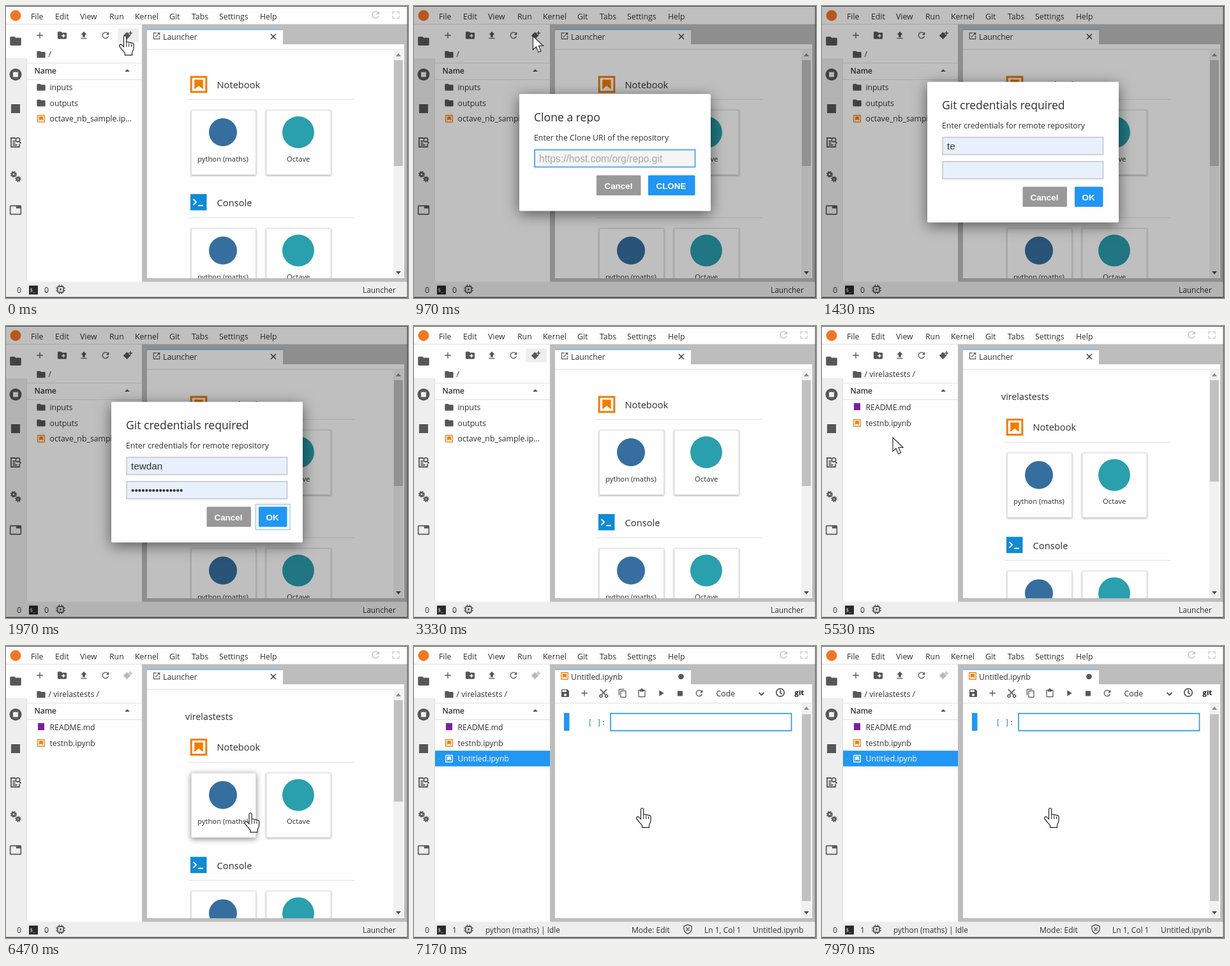
An HTML page for the animation above (8 s loop, 630 by 458 pixels).

```html
<!DOCTYPE html>
<html lang="en">
<head>
<meta charset="utf-8">
<title>Cloning a repository</title>
<style>
html, body { margin: 0; width: 100%; height: 100%; overflow: hidden; background: #fff; }
svg { display: block; width: 100vw; height: 100vh; }
text { font-family: "Open Sans", "Noto Sans", sans-serif; white-space: pre; }
.arial { font-family: "Liberation Sans", Arial, sans-serif; }
.mono { font-family: "DejaVu Sans Mono", monospace; }
.card { filter: drop-shadow(0 1px 1.5px #0005); }
.raised { filter: drop-shadow(0 2px 4px #0007); }
.dialog { filter: drop-shadow(0 5px 11px #0008); }
</style>
</head>
<body>
<svg id="stage" viewBox="0 0 630 458"></svg>
<script>
const LOOP = 8000;
const REPO = 'virelastests';
const C = {
  paper: '#fefefe', chrome: '#eeeeee', line: '#e0e0e2', gap: '#bdbdbd', ink: '#303030',
  icon: '#575757', blue: '#2196f3', orange: '#f57c00', pale: '#c4c4c4', muted: '#999999'
};

const rect = (x, y, w, h, fill, more = '') =>
  `<rect x="${x}" y="${y}" width="${w}" height="${h}" fill="${fill}" ${more}/>`;
const box = (x, y, w, h, stroke, more = '') =>
  rect(x, y, w, h, 'none', `stroke="${stroke}" ${more}`);
const disc = (x, y, r, fill) => `<circle cx="${x}" cy="${y}" r="${r}" fill="${fill}"/>`;
const ring = (x, y, r, width, more = '') =>
  `<circle cx="${x}" cy="${y}" r="${r}" fill="none" stroke="${C.icon}" stroke-width="${width}" ${more}/>`;
const path = (d, fill, more = '') => `<path d="${d}" fill="${fill}" ${more}/>`;
const stroke = (d, color, width = 1.5) =>
  path(d, 'none', `stroke="${color}" stroke-width="${width}"`);
const text = (x, y, s, size = 12.3, fill = C.ink, more = '') =>
  `<text x="${x}" y="${y}" font-size="${size}" fill="${fill}" ${more}>${s}</text>`;
const group = (id, body, more = '') => `<g id="${id}" ${more}>${body}</g>`;

const GLYPH = {
  folder: 'M10 4H4c-1.1 0-2 .9-2 2v12c0 1.1.9 2 2 2h16c1.1 0 2-.9 2-2V8c0-1.1-.9-2-2-2h-8z',
  newFolder: 'M10 4H4c-1.1 0-2 .9-2 2v12c0 1.1.9 2 2 2h16c1.1 0 2-.9 2-2V8c0-1.1-.9-2-2-2h-8zM14 9h2v3h3v2h-3v3h-2v-3h-3v-2h3z',
  plus: 'M19 13h-6v6h-2v-6H5v-2h6V5h2v6h6z',
  upload: 'M5 20h14v-2H5zM5 10h4v6h6v-6h4l-7-7z',
  refresh: 'M17.65 6.35A8 8 0 0 0 12 4a8 8 0 1 0 7.73 10h-2.08A6 6 0 1 1 12 6c1.66 0 3.14.69 4.22 1.78L13 11h7V4z',
  tabs: 'M21 3H3a2 2 0 0 0-2 2v14a2 2 0 0 0 2 2h18a2 2 0 0 0 2-2V5a2 2 0 0 0-2-2zM21 19H3V5h10v4h8z',
  open: 'M19 19H5V5h7V3H3v18h18v-9h-2zM14 3v2h3.6l-9.8 9.8 1.4 1.4L19 6.4V10h2V3z',
  save: 'M17 3H5a2 2 0 0 0-2 2v14a2 2 0 0 0 2 2h14a2 2 0 0 0 2-2V7zM12 19a3 3 0 1 1 0-6 3 3 0 0 1 0 6zM15 9H5V5h10z',
  copy: 'M16 1H4a2 2 0 0 0-2 2v14h2V3h12zM19 5H8a2 2 0 0 0-2 2v14a2 2 0 0 0 2 2h11a2 2 0 0 0 2-2V7a2 2 0 0 0-2-2zM19 21H8V7h11z',
  paste: 'M19 3h-4a3 3 0 0 0-6 0H5a2 2 0 0 0-2 2v15a2 2 0 0 0 2 2h14a2 2 0 0 0 2-2V5a2 2 0 0 0-2-2zM19 20H5V5h2v3h10V5h2z',
  play: 'M8 5v14l11-7z',
  full: 'M5 14H3v7h7v-2H5zM3 10h2V5h5V3H3zM19 19h-5v2h7v-7h-2zM14 3v2h5v5h2V3z',
  caret: 'M6 15l6-6 6 6z'
};
// Icons are drawn on a 24 unit grid, centred on (x, y).
const icon = (name, x, y, size = 16, fill = C.icon) =>
  path(GLYPH[name], fill, `fill-rule="evenodd" transform="translate(${x - size / 2} ${y - size / 2}) scale(${size / 24})"`);
const bookmark = (x, y, s, color = C.orange) =>
  box(x - s * 7 / 16, y - s * 7 / 16, s * 7 / 8, s * 7 / 8, color, `stroke-width="${s / 9}"`) +
  path(`M${x - s * .25} ${y - s * .28}h${s * .5}v${s * .56}l${-s * .25} ${-s * .2}l${-s * .25} ${s * .2}z`, color);
const gear = (x, y, r) =>
  ring(x, y, r, 2.4) + ring(x, y, r + 1.6, 1.8, `stroke-dasharray="${(r + 1.6) * Math.PI / 8}"`);

function menuBar() {
  const items = { File: 39, Edit: 77, View: 116, Run: 162, Kernel: 202, Git: 256, Tabs: 291, Settings: 334, Help: 398 };
  return rect(0, 0, 630, 29, C.paper) + disc(15, 15, 8.5, '#f37726') +
    Object.entries(items).map(([s, x]) => text(x, 20.5, s)).join('') +
    group('corner', icon('refresh', 579, 14, 18, C.pale) + icon('full', 611, 14, 15, C.pale));
}

function sideBar() {
  return rect(0, 29, 33, 404, C.chrome) + rect(0, 29, 33, 53, C.paper) + rect(32, 82, 1, 350, C.line) +
    icon('folder', 15, 55, 21) +
    disc(15, 107.5, 9.5, C.icon) + rect(11, 103.5, 8, 8, C.chrome, 'rx="1"') +
    rect(8, 154, 14, 14, C.icon) +
    stroke('M15 207H8v14h13v-5M10.5 212h4M10.5 215h4M10.5 218h7', C.icon, 1.8) +
    ring(18.5, 210, 3.2, 1.8) + stroke('M20.5 212.5l3 3', C.icon, 1.8) +
    gear(12, 264, 2.7) + gear(19, 271.5, 2.2) +
    icon('tabs', 15, 320, 20);
}

const fileText = (row, s, fill) => text(68.5, 132 + row * 24.6, s, 12.25, fill);
const dirRow = (row, s, fill) => icon('folder', 55, 127.5 + row * 24.6, 16, fill || C.icon) + fileText(row, s, fill);
const bookRow = (row, s, fill) => bookmark(55, 127.5 + row * 24.6, 12, fill) + fileText(row, s, fill);
const rowBand = (row, fill) => rect(33, 115 + row * 24.6, 180, 24.6, fill);

function filePanel() {
  const crumb = s => icon('folder', 55, 76, 16) + text(66.5, 80, s);
  return rect(33, 29, 180, 404, C.paper) +
    group('hoverClone', rect(175, 35, 33, 22, C.chrome)) +
    icon('plus', 53, 46) + icon('newFolder', 88, 46, 17) + icon('upload', 122, 46) + icon('refresh', 156, 46) +
    group('cloneIcon', rect(185.5, 42.5, 8, 8, C.icon, 'transform="rotate(45 189.5 46.5)"') + stroke('M195 39.5v6M192 42.5h6', C.icon, 1.4)) +
    rect(33, 89, 180, 1, C.line) + rect(33, 115, 180, 1, C.line) +
    text(44.5, 106, 'Name', 11.9, C.ink, 'font-weight="600"') + icon('caret', 190, 101, 16) +
    group('root', crumb('/') + dirRow(0, 'inputs') + dirRow(1, 'outputs') +
      group('before', bookRow(2, 'octave_nb_sample.ip...')) +
      group('cloned', bookRow(3, 'octave_nb_sample.ip...') +
        group('plainRow', dirRow(2, REPO)) +
        group('pickedRow', rowBand(2, C.blue) + dirRow(2, REPO, '#fff')))) +
    group('inside', crumb(`/ ${REPO} /`) + rect(50, 121, 10, 11, '#7b1fa2') + fileText(0, 'README.md') + bookRow(1, 'testnb.ipynb')) +
    group('newFile', rowBand(2, C.blue) + disc(39, 177, 2, '#4caf50') + bookRow(2, 'Untitled.ipynb', '#fff'));
}

function launcherSection(y, title, mark) {
  const card = (x, label, labelX, logo, key) =>
    rect(x, y + 40.5, 101, 101, C.paper, `class="card" id="${key}" stroke="${C.line}" stroke-width="1"`) + logo +
    text(labelX, y + 120.5, label, 11.3);
  return mark + text(330.5, y + 5.5, title, 14.7) + rect(286, y + 23, 260, 1, C.line) +
    card(290.5, 'python (maths)', 300, disc(340, y + 75, 22, '#366f9f'), title + 'Python') +
    card(408, 'Octave', 440, disc(458, y + 75, 25, '#2a9fae'), title + 'Octave');
}

const scrollBar = (top, thumb, height) =>
  rect(607, top, 15, 427 - top, '#f1f1f1') + rect(608, thumb, 14, height, '#c1c1c1') +
  path(`M611 ${top + 10}l4-5 4 5z`, '#8a8a8a') + path('M611 416l4 5 4-5z', '#505050');
const tabTitle = s => text(246, 53, s);

function launcher() {
  const consoleMark = rect(289, 295, 25.5, 25.5, '#0f8ad6') + stroke('M293.5 303l4.5 4.5-4.5 4.5M301 313h8', '#fff', 2);
  return group('launcher',
    icon('open', 236, 47, 14) + tabTitle('Launcher') + stroke('M415 44l8 8M423 44l-8 8', C.ink, 1.3) +
    rect(221, 67.5, 403, 1, C.line) +
    `<g clip-path="url(#pane)">` + group('heading', text(281, 115.5, REPO, 14.3)) +
    group('content', launcherSection(123, 'Notebook', bookmark(302, 123, 27)) + launcherSection(308.5, 'Console', consoleMark)) + '</g>' +
    group('shortBar', scrollBar(69, 85, 166)) + group('longBar', scrollBar(69, 85, 159)));
}

function notebook() {
  return group('notebook',
    bookmark(236, 47, 12) + tabTitle('Untitled.ipynb') + disc(418.5, 48, 4.3, C.icon) +
    icon('save', 237, 74) + icon('plus', 267, 74) +
    stroke('M292 68l8.5 9M302 68l-8.5 9', C.icon, 1.8) + ring(293, 78.5, 2, 1.5) + ring(301.5, 78.5, 2, 1.5) +
    icon('copy', 327, 74, 15) + icon('paste', 357, 74, 15) + icon('play', 387, 74) + rect(413, 70.5, 8, 8, C.icon) + icon('refresh', 447, 74) +
    text(473.5, 78.5, 'Code') + stroke('M540.5 73l4 4 4-4', C.ink) +
    ring(574, 73, 6.2, 1.7) + stroke('M574 69v4.5l3 2', C.ink, 1.4) +
    text(596.5, 77, 'git', 11.3, '#111', 'font-weight="700"') +
    rect(221, 89, 403, 1, C.line) +
    rect(235, 105, 8.5, 28, C.blue, 'rx="1"') +
    text(272.5, 124, '[ ]:', 11.6, '#307fc1', 'class="mono"') +
    box(308, 105.8, 283.5, 27, C.blue, 'stroke-width="1.6"') +
    scrollBar(90, 107, 293));
}

function mainArea() {
  return rect(213, 29, 417, 404, C.gap) + rect(221, 37, 213, 24, C.paper) + rect(221, 60, 403, 367, C.paper) +
    rect(221, 36.3, 213, 1.4, '#6cb8f5') + launcher() + notebook();
}

function statusBar() {
  const y = 449.5, s = 11.9;
  return rect(0, 432.5, 630, 25.5, C.chrome) + text(17, y, '0') +
    rect(36, 438.5, 14, 14, '#2a2a2a') + text(37.5, 448, '$_', 7.5, '#fff', 'class="mono"') +
    box(81, 440, 9, 9, C.icon, 'stroke-width="1.8" rx="1"') + rect(84, 443, 3, 3, C.icon) +
    stroke('M83.5 437v3M87.5 437v3M83.5 449v3M87.5 449v3M78 442.5h3M78 446.5h3M90 442.5h3M90 446.5h3', C.icon, 1.3) +
    group('idleStatus', text(60, y, '0') + text(559, y, 'Launcher', s)) +
    group('bookStatus', text(60, y, '1') + text(112, y, 'python (maths) | Idle', s) + text(341, y, 'Mode: Edit', 12) +
      stroke('M429 437l6 2.5v4c0 4-2.5 6.5-6 8-3.5-1.5-6-4-6-8v-4zM426.5 441.5l5 5M431.5 441.5l-5 5', C.icon, 1.5) +
      text(455, y, 'Ln 1, Col 1', 12) + text(531, y, 'Untitled.ipynb', 12.1));
}

const button = (x, y, w, label, labelX, fill) =>
  rect(x, y, w, 31.5, fill, 'rx="1.5"') + text(labelX, y + 21, label, 13.4, '#fff', 'class="arial" font-weight="700"');
const field = (y, edge, fill, width = 1.3) => rect(189, y, 251.5, 27, fill, `stroke="${edge}" stroke-width="${width}"`);
const dialog = (y, h, title, hint) =>
  rect(165, y, 300, h, C.paper, 'class="dialog" rx="2"') + text(188, y + 43, title, 17.6) + text(188, y + 73, hint, 12.35);

function dialogs() {
  return group('veil', rect(0, 0, 630, 458, 'rgba(0,0,0,.25)')) +
    group('cloneDialog', dialog(138, 183.5, 'Clone a repo', 'Enter the Clone URI of the repository') +
      field(225.5, '#55acf3', '#f5f5f5', 2) +
      text(196, 244.5, 'https://host.com/org/repo.git', 15.6, '#a9a9a9', 'class="arial"') +
      button(286, 265.5, 69.5, 'Cancel', 298.5, C.muted) + button(367, 265.5, 73.5, 'CLONE', 379.5, C.blue)) +
    group('loginDialog', dialog(119, 220.5, 'Git credentials required', 'Enter credentials for remote repository') +
      field(206, C.gap, '#e8f0fe') + field(244, C.gap, '#e8f0fe') +
      text(196, 224.5, '', 15.3, C.ink, 'id="user" class="arial"') + text(196, 262.5, '', 15.5, C.ink, 'id="secret" class="arial"') +
      button(314.5, 283.5, 69.5, 'Cancel', 326.5, C.muted) + button(396, 283.5, 44.5, 'OK', 407.5, C.blue) +
      group('focusRing', box(391.5, 279.5, 53.5, 40, '#7dbdf5')));
}

const frameEdge = rect(0, 0, 630, 1, '#555') + rect(0, 28, 630, 1, C.line) + rect(0, 456.5, 630, 1.5, '#4b4b4b') + rect(628.5, 0, 1.5, 458, '#777');
const pointers =
  group('arrow', path('M0 0V21.5L5 17l3.5 8.5 4-1.8-3.6-8.2H16z', '#fff', 'stroke="#222" stroke-width="1.1"')) +
  group('hand', path('M-2 2c0-3 4.2-3 4.2 0v9c0-2.5 4-2.2 4 .3 0-2 3.8-1.6 3.8.8 0-1.8 3.6-1.3 3.6 1v6c0 3-2 4.5-2.5 7.5v3.5H0v-3c-2-3-5.5-6.5-8.500-10.500-1.5-2.5 1.500-4.500 3.500-2.500l3 3z', '#fff', 'stroke="#222" stroke-width="1.2"') +
    stroke('M2.2 11v6M6.2 12v5M10 13v4', '#222', 1));

const stage = document.getElementById('stage');
stage.innerHTML = '<clipPath id="pane"><rect x="221" y="69" width="386" height="358"/></clipPath>' +
  menuBar() + sideBar() + filePanel() + mainArea() + statusBar() + frameEdge + dialogs() + group('pointer', pointers);
const el = id => document.getElementById(id);

const OPEN = 370, LOGIN = 1300, CLOSE = 2170, CLONED = 3670, PICK = 5050, ENTER = 5300, BOOK = 7030;
// Each part is visible during the listed [start, end) spans.
const SPANS = {
  corner: [[0, OPEN], [CLOSE, LOOP]],
  hoverClone: [[0, OPEN], [CLOSE, 4020]],
  root: [[0, ENTER]], before: [[0, CLONED]], cloned: [[CLONED, ENTER]],
  plainRow: [[CLONED, PICK]], pickedRow: [[PICK, ENTER]],
  inside: [[ENTER, LOOP]], heading: [[ENTER, BOOK]],
  shortBar: [[0, ENTER]], longBar: [[ENTER, BOOK]],
  launcher: [[0, BOOK]], idleStatus: [[0, BOOK]],
  notebook: [[BOOK, LOOP]], bookStatus: [[BOOK, LOOP]], newFile: [[BOOK, LOOP]],
  veil: [[OPEN, CLOSE]], cloneDialog: [[OPEN, LOGIN]], loginDialog: [[LOGIN, CLOSE]], focusRing: [[1900, CLOSE]],
  pointer: [[0, 1130], [3650, LOOP]]
};
// Pointer stops: time, x, y.
const STOPS = [[0, 186.5, 47], [3850, 186.5, 47], [4600, 111, 175], [5620, 111, 175], [6380, 383, 262], [6550, 383, 262], [6850, 357.5, 254.5], [LOOP, 357.5, 254.5]];

const ease = p => p * p * (3 - 2 * p);
const typed = (s, t, from, to) => s.slice(0, Math.max(0, Math.floor(s.length * (t - from) / (to - from))));
const show = (id, on) => { el(id).style.display = on ? '' : 'none'; };

function pointerAt(t) {
  const i = Math.max(1, STOPS.findIndex(s => s[0] > t));
  const [t0, x0, y0] = STOPS[i - 1], [t1, x1, y1] = STOPS[i];
  const p = ease((t - t0) / (t1 - t0));
  return [x0 + (x1 - x0) * p, y0 + (y1 - y0) * p];
}

function draw(t) {
  for (const [id, spans] of Object.entries(SPANS)) show(id, spans.some(([a, b]) => t >= a && t < b));
  el('content').setAttribute('transform', `translate(0 ${t < ENTER ? 0 : 35.7})`);
  el('cloneIcon').setAttribute('opacity', t < 5700 ? 1 : .4);
  el('user').textContent = typed('tewdan', t, 1360, 1560);
  el('secret').textContent = typed('•'.repeat(15), t, 1600, 1860);
  const [x, y] = pointerAt(t);
  const overCard = x > 290 && x < 392 && y > 199;
  const overClone = (t < OPEN || t > CLOSE) && x > 175 && x < 208 && y < 57;
  el('pointer').setAttribute('transform', `translate(${x} ${y})`);
  show('hand', overCard || overClone);
  show('arrow', !overCard && !overClone);
  el('NotebookPython').setAttribute('class', overCard ? 'raised' : 'card');
}

const start = performance.now();
function tick() {
  draw((performance.now() - start) % LOOP);
  requestAnimationFrame(tick);
}
tick();
</script>
</body>
</html>
```
